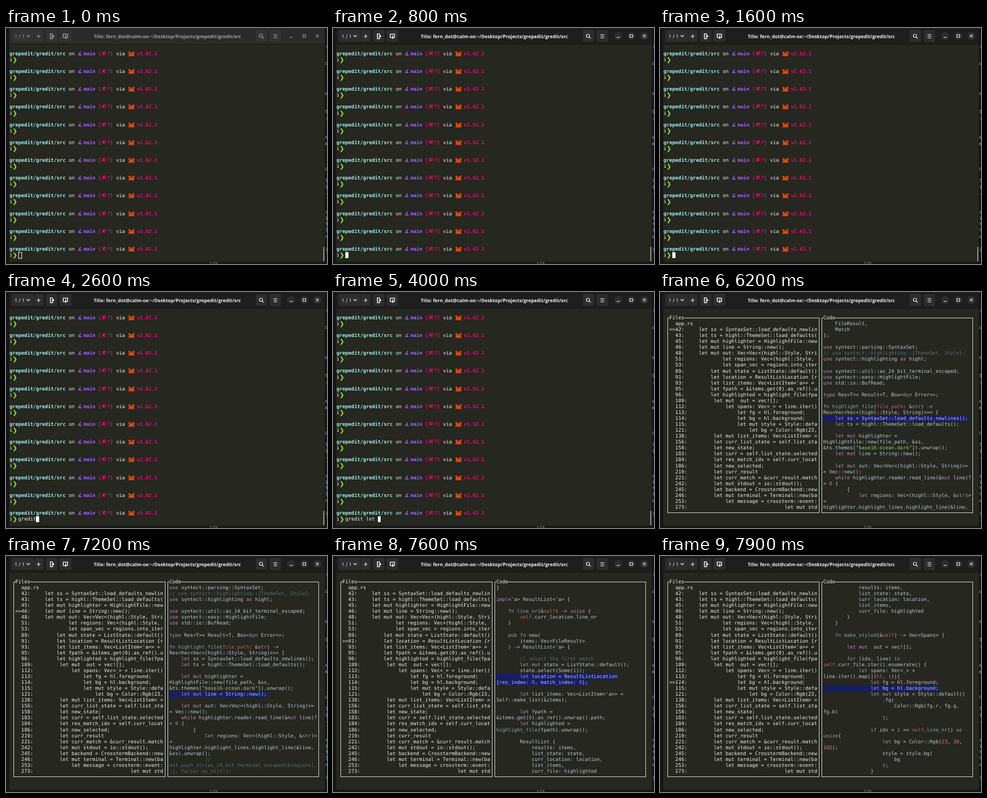
An HTML page that plays this animation: 600x441 px, repeating every 8 s.

```html
<!DOCTYPE html>
<html lang="en">
<head>
<meta charset="utf-8">
<title>Terminal search session</title>
<style>
  :root { --cw: 5.533px; --rh: 11.06px; --bg: #252720; --fg: #f1f1ea; }
  html, body { margin: 0; width: 100%; height: 100%; overflow: hidden; background: #161616; }
  #stage { position: relative; width: 600px; height: 441px; overflow: hidden; background: #161616; }
  #window { position: absolute; left: 6px; top: 0; width: 590px; height: 437px; background: var(--bg); }
  #bar { position: absolute; left: 0; top: 0; --bar: #1e1e1e; --button: #2d2d2d; --ink: #f2f2f2; }
  #bar.idle { --bar: #2a2a2a; --button: #333; --ink: #a2a2a2; }
  #bar.idle circle.control { fill: none; }
  #bar .back { fill: var(--bar); }
  #bar .buttons { fill: var(--button); }
  #bar .icons { fill: none; stroke: var(--ink); stroke-width: 1.2; }
  #bar text { fill: var(--ink); }
  #bar .title { font: bold 8.8px "Open Sans", "Noto Sans", sans-serif; }
  #bar .tab { font: 9.4px "Open Sans", "Noto Sans", sans-serif; }
  #bar text, .grid, #behind { text-rendering: geometricPrecision; }
  .grid {
    position: absolute; left: 6.5px; top: 31.9px; width: 588px; height: 398px;
    font: 9.19px/var(--rh) "DejaVu Sans Mono", "Liberation Mono", monospace;
    color: var(--fg); white-space: pre; font-variant-ligatures: none;
  }
  .cell {
    position: absolute; height: var(--rh);
    left: calc(var(--c) * var(--cw)); top: calc(var(--r) * var(--rh));
  }
  .path { color: #a1efe4; font-weight: bold; }
  .branch { color: #9d65ff; font-weight: bold; }
  .pink { color: #ee0a6a; font-weight: bold; }
  .cross { color: #ee0a6a; font: bold 10.5px/11px "DejaVu Sans", sans-serif; }
  .arrow { color: #98f026; font: bold 11px/11px "DejaVu Sans", sans-serif; }
  #cursor { width: 7px; height: 12px; box-sizing: border-box; border: 1px solid #fff; }
  #cursor.on { width: 5.5px; height: var(--rh); background: #fff; }
  #scrollbar { position: absolute; left: 593px; top: 409px; width: 2px; height: 27px; background: #94948d; }
  .box { position: absolute; top: 48px; height: 363px; border: 1px solid #dcdcd5; }
  .label { background: var(--bg); }
  .pane { width: calc(50 * var(--cw)); height: calc(32 * var(--rh)); overflow: hidden; }
  .sel { font-style: italic; }
  #code { color: #c0c5ce; }
  #code .hit { background: #171e66; }
  .kw { color: #b48ead; } .str { color: #a3be8c; } .num { color: #d08770; }
  .com { color: #5f6a70; } .red { color: #bf616a; } .fn { color: #8fa1b3; }
  #behind span { position: absolute; font: 9px/11px "DejaVu Sans Mono", monospace; }
</style>
</head>
<body>
<div id="stage">
  <div id="behind"></div>
  <div id="window"></div>
  <svg id="bar" width="600" height="31">
    <path class="back" d="M6 30V4q0-4 4-4H592q4 0 4 4V30z"/>
    <path d="M6 30.5H596" stroke="#191919"/>
    <g class="buttons">
      <rect x="10" y="4" width="42" height="22" rx="3"/>
      <rect x="53" y="4" width="17" height="22" rx="3"/>
      <rect x="75" y="4" width="21" height="22" rx="3"/>
      <rect x="100" y="4" width="22" height="22" rx="3"/>
      <rect x="467" y="4" width="21" height="22" rx="3"/>
      <rect x="493" y="4" width="21" height="22" rx="3"/>
      <circle class="control" cx="533" cy="15" r="7.5"/>
      <circle class="control" cx="557.5" cy="15" r="7.5"/>
      <circle class="control" cx="582" cy="15" r="7.5"/>
    </g>
    <g class="icons">
      <path d="M38.5 13.5l3 3 3-3M57.5 15.5h7M61 12v7"/>
      <path d="M87 11h-4v9h4v-2.500M87 11v2.500M85 15.500h4.500M87.500 13.500l2 2-2 2" stroke-width="1.5"/>
      <path d="M109 17.500h-2v-6h8v6h-1.500M111.500 14v5.500M109.500 17.500l2 2 2-2" stroke-width="1.5"/>
      <circle cx="476.5" cy="14.5" r="3"/><path d="M478.8 16.8l3 3"/>
      <path d="M500 12.5h7M500 15.5h7M500 18.5h7"/>
      <path d="M530 17.5h6M555 12.5h5v5h-5zM579.5 12.5l5 5m0-5l-5 5"/>
    </g>
    <text class="tab" x="16" y="18.5">1 / 1</text>
    <text class="title" x="301.5" y="18.5" text-anchor="middle">Tilix: fern_dot@calm-ox:~/Desktop/Projects/grepedit/gredit/src</text>
  </svg>
  <div id="shell">
    <div id="prompts" class="grid"></div>
    <div id="scrollbar"></div>
  </div>
  <div id="tui" hidden>
    <div class="box" style="left:14px; width:282px"></div>
    <div class="box" style="left:302px; width:281px"></div>
    <div id="panes" class="grid"></div>
  </div>
</div>
<script>
const LOOP = 8000, COLS = 50, ROWS = 32, LEAD = 15, FIRST = 27;
const $ = id => document.getElementById(id);

// Lines of app.rs, starting at number FIRST.
const code = `    FileResult,
    Match
};

use syntect::parsing::SyntaxSet;
// use syntect::highlighting::{ThemeSet, Style};
use syntect::highlighting as highl;

use syntect::util::as_24_bit_terminal_escaped;
use syntect::easy::HighlightFile;
use std::io::BufRead;

type Res<T>= Result<T, Box<dyn Error>>;

fn highlight_file(file_path: &str) -> Res<Vec<Vec<(highl::Style, String)>>> {
    let ss = SyntaxSet::load_defaults_newlines();
    let ts = highl::ThemeSet::load_defaults();

    let mut highlighter = HighlightFile::new(file_path, &ss, &ts.themes["base16-ocean.dark"]).unwrap();
    let mut line = String::new();

    let mut out: Vec<Vec<(highl::Style, String)>> = Vec::new();
    while highlighter.reader.read_line(&mut line)? > 0 {
        {
            let regions: Vec<(highl::Style, &str)> = highlighter.highlight_lines.highlight_line(&line, &ss).unwrap();
            // out.push_str(as_24_bit_terminal_escaped(&regions[..], false).as_str());
            let span_vec = regions.into_iter().map(|(style, text)|
                (style, text.to_string())
            ).collect();
            out.push(span_vec);
        }
        line.clear();
    }

    Ok(out)
}

#[derive(Debug, Clone)]
struct ResultListLocation {
    res_index: usize,
    match_index: usize
}

pub struct ResultList<'a> {
    results: Vec<FileResult>,
    list_state: ListState,
    curr_location: ResultListLocation,
    list_items: Vec<ListItem<'a>>,
    curr_file: Vec<Vec<(highl::Style, String)>>
}

impl<'a> ResultList<'a> {

    fn line_nr(&self) -> usize {
        self.curr_location.line_nr
    }

    pub fn new(
        items: Vec<FileResult>
    ) -> ResultList<'a> {

        // select the first match
        let mut state = ListState::default();
        state.select(Some(1));
        let location = ResultListLocation {res_index: 0, match_index: 0};

        let list_items: Vec<ListItem<'a>> = Self::make_list(&items);

        let fpath = &items.get(0).as_ref().unwrap().path;
        let highlighted = highlight_file(fpath).unwrap();

        ResultList {
            results: items,
            list_state: state,
            curr_location: location,
            list_items,
            curr_file: highlighted
        }
    }

    fn make_styled(&self) -> Vec<Spans> {

        let mut  out = vec![];

        for (idx, line) in self.curr_file.iter().enumerate() {
            let spans: Vec<_> = line.iter().map(|(hl, s)|{
                let fg = hl.foreground;
                let bg = hl.background;
                let mut style = Style::default()
                    .fg(
                        Color::Rgb(fg.r, fg.g, fg.b)
                    );

                if idx + 1 == self.line_nr() as usize{
                    let bg = Color::Rgb(23, 30, 102);
                    style = style.bg(
                        bg
                    );
                }`.split("\n");

// Matches further down the file: number, indent, text.
const later = [
  [138, 8, "let mut list_items: Vec<ListItem> = "],
  [156, 8, "let curr_list_state = self.list_state"],
  [158, 8, "let new_state;"],
  [183, 8, "let curr = self.list_state.selected()"],
  [184, 8, "let res_match_idx = self.curr_location"],
  [186, 8, "let new_selected;"],
  [219, 8, "let curr_result"],
  [221, 8, "let curr_match = &curr_result.matches"],
  [242, 8, "let mut stdout = io::stdout();"],
  [245, 8, "let backend = CrosstermBackend::new("],
  [246, 8, "let mut terminal = Terminal::new(backend)"],
  [253, 12, "let message = crossterm::event::read()"],
  [273, 32, "let mut stdout"]
];
const matches = code
  .map((text, i) => [FIRST + i, text])
  .filter(([, text]) => /^\s*let /.test(text))
  .concat(later.map(([n, indent, text]) => [n, " ".repeat(indent) + text]));

function cell(parent, col, row, text, cls = "") {
  const el = document.createElement("span");
  el.className = "cell " + cls;
  el.style.setProperty("--c", col);
  el.style.setProperty("--r", row);
  el.textContent = text;
  parent.append(el);
  return el;
}

const crab = `<svg width="13" height="11" viewBox="0 0 13 11" fill="#e84a0c">
  <ellipse cx="6.500" cy="6.500" rx="4.300" ry="3.200"/>
  <ellipse cx="2.800" cy="2.600" rx="2" ry="2.200"/>
  <ellipse cx="10.200" cy="2.600" rx="2" ry="2.200"/>
  <path d="M2.500 4l1.500 2M10.500 4L9 6M3 6.500L1 8M3.300 8L1.500 10M10 6.500L12 8M9.700 8l1.800 2" stroke="#e84a0c" stroke-width="1.300"/>
  <path d="M2.800 0v2M10.200 0v2M5.300 4v1.200M7.700 4v1.200" stroke="#3a1a0c" stroke-width=".8"/></svg>`;

const prompts = $("prompts"), panes = $("panes");
for (let r = 1; r < 36; r += 3) {
  cell(prompts, 0, r, "grepedit/gredit/src", "path");
  cell(prompts, 20, r, "on");
  cell(prompts, 23, r, "∡", "branch");
  cell(prompts, 25, r, "main", "branch");
  cell(prompts, 30, r, "[ !?]", "pink");
  cell(prompts, 31, r, "✘", "cross");
  cell(prompts, 36, r, "via");
  cell(prompts, 40, r, "").innerHTML = crab;
  cell(prompts, 43, r, "v1.62.1", "pink");
  cell(prompts, 0, r + 1, "i");
  cell(prompts, 1, r + 1, "❯", "arrow");
}
const input = cell(prompts, 3, 35, "");
const cursor = cell(prompts, 3, 35, "");
cursor.id = "cursor";

cell(panes, 2, 1, "Files", "label");
cell(panes, 54, 1, "Code", "label");
cell(panes, 4, 2, "app.rs");
const list = cell(panes, 2, 3, "", "pane");
const view = cell(panes, 54, 2, "", "pane");
view.id = "code";

// Edge of the window lying behind.
const edge = [[30, ":"], [62, "d"], [118, "e"], [153, "l"], [165, ":"], [200, "e"], [212, "e"], [259, "d"],
  [282, "l"], [293, "("], [304, "."], [340, "s"], [351, "i"], [362, "t"], [374, "l"], [386, ">"], [410, "("]];
const edgeColors = ["#b9b9b0", "#5fb8a8", "#77a9c4"];
function behind(x, y, text, color) {
  const el = document.createElement("span");
  el.textContent = text;
  Object.assign(el.style, { left: x + "px", top: y + "px", color });
  $("behind").append(el);
}
edge.forEach(([y, ch], i) => behind(596.5, y, ch, edgeColors[i % 3]));
behind(379, 435, "339", "#888");

const esc = s => s.replace(/[&<>]/g, c => ({ "&": "&amp;", "<": "&lt;", ">": "&gt;" })[c]);
const span = (cls, html) => `<span class="${cls}">${html}</span>`;

const kinds = ["com", "str", "kw", "red", "fn", "num"];
const token = new RegExp([
  "(//[^]*)", '("[^"]*")',
  "\\b(let|mut|use|type|fn|pub|struct|impl|dyn|while|for|in|if|as|str|usize)\\b",
  "\\b(self|file_path(?=:)|hl(?=,)|s(?=\\)\\|))\\b",
  "\\b(highlight_file|make_styled|line_nr)(?=\\()",
  "\\b(\\d+)\\b"
].join("|"), "g");

function paint(text) {
  let html = "", at = 0;
  for (const m of text.matchAll(token)) {
    const kind = kinds[m.slice(1).findIndex(Boolean)];
    html += esc(text.slice(at, m.index)) + span(kind, esc(m[0]));
    at = m.index + m[0].length;
  }
  return html + esc(text.slice(at));
}

// Word wrap; words longer than a row are cut.
function wrap(line) {
  let done = "", row = "";
  for (const word of line.match(/\s*\S+/g) || []) {
    if ((row + word).length <= COLS) { row += word; continue; }
    if (row) done += row + "\n";
    row = word.trimStart();
    while (row.length > COLS) {
      done += row.slice(0, COLS) + "\n";
      row = row.slice(COLS);
    }
  }
  return done + row;
}

function showMatch(index) {
  list.innerHTML = matches.map(([n, text], i) => {
    const on = i === index;
    const row = esc(((on ? ">>" : "  ") + n + ": " + text).slice(0, COLS));
    return on ? span("sel", row) : row;
  }).join("\n");
  const start = matches[index][0] - LEAD - FIRST;
  view.innerHTML = code.slice(start, start + ROWS).map((text, i) => {
    const html = paint(wrap(text));
    return i === LEAD ? span("hit", html) : html;
  }).join("\n");
}

const command = "gredit let app.rs ";
const keyTimes = [1900, 2000, 2100, 2200, 2400, 2500, 2700, 3100, 3200, 3300, 3500, 4900, 5100];
const FOCUS = 400, COMPLETE = 5300, RUN = 5700;
const moves = [[RUN, 0], [6600, 1], [6900, 2], [7100, 3], [7500, 5], [7600, 8], [7700, 10], [7800, 13], [7900, 15]];

let shown = -1;
function draw() {
  const t = performance.now() % LOOP;
  const running = t >= RUN, focused = t >= FOCUS;
  $("shell").hidden = running;
  $("tui").hidden = !running;
  $("bar").classList.toggle("idle", !focused);
  if (running) {
    const index = moves.filter(([at]) => at <= t).pop()[1];
    if (index !== shown) showMatch(shown = index);
  } else {
    const typed = t >= COMPLETE ? command.length : keyTimes.filter(at => at <= t).length;
    input.textContent = command.slice(0, typed);
    cursor.style.setProperty("--c", 3 + typed);
    cursor.classList.toggle("on", focused);
  }
  requestAnimationFrame(draw);
}
draw();
</script>
</body>
</html>
```
